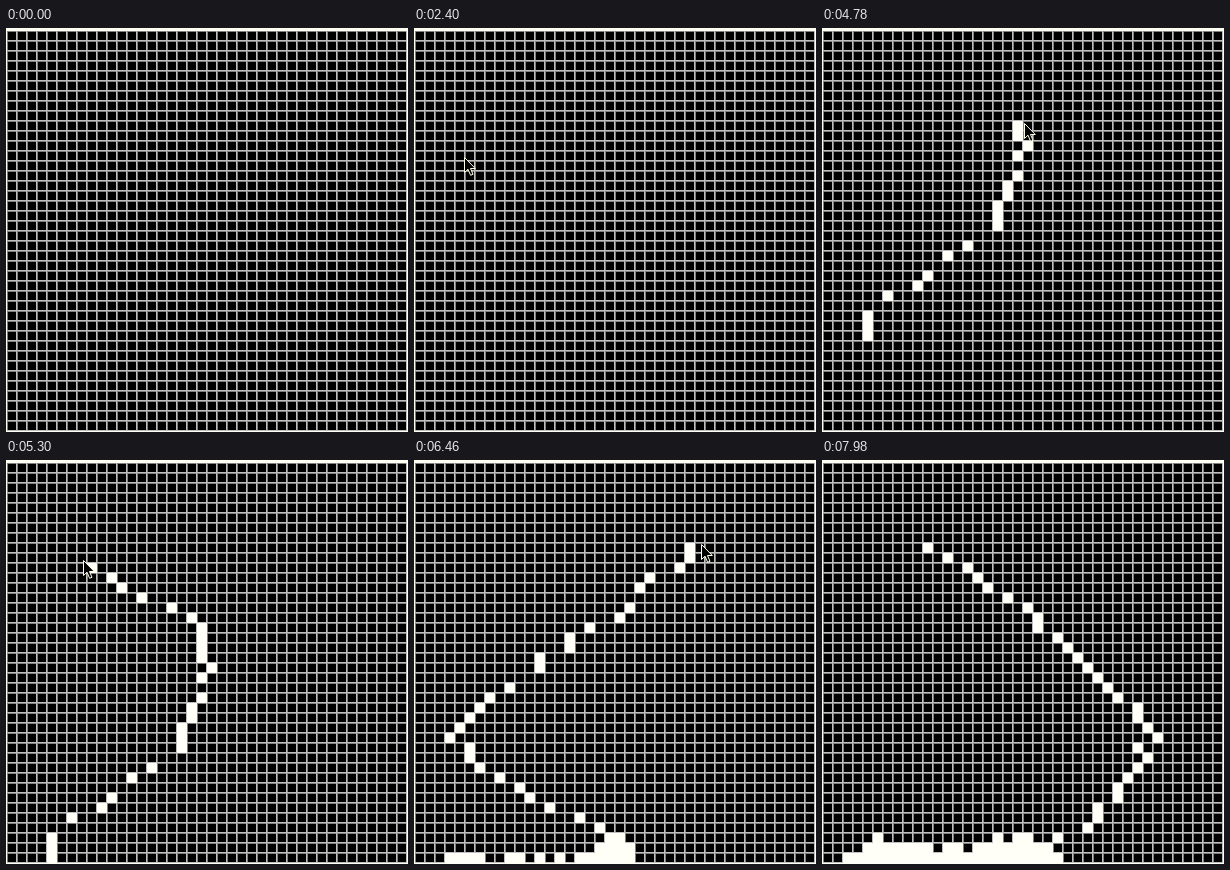
Recreate the animation shown at these times as an HTML page. Size 402 by 404 pixels, loop 8000 ms.

```html
<!DOCTYPE html>
<html lang="en">
<head>
<meta charset="utf-8">
<title>Falling sand</title>
<style>
  html, body { margin: 0; width: 100%; height: 100%; overflow: hidden; background: #fff; }
  svg { display: block; width: 402px; height: 404px; }
</style>
</head>
<body>
<svg viewBox="0 0 402 404" shape-rendering="crispEdges">
  <defs>
    <pattern id="cell" x="1" y="3" width="10" height="10" patternUnits="userSpaceOnUse">
      <rect width="10" height="10" fill="#000"/>
      <path d="M0 0h10v1h-9v9h-1z" fill="#808080"/>
      <path d="M9 0h1v10h-10v-1h9z" fill="#bfbfbf"/>
    </pattern>
  </defs>
  <rect width="402" height="404" fill="#fffff4"/>
  <rect x="1" y="3" width="400" height="400" fill="url(#cell)"/>
  <path id="sand" fill="#fffff8"/>
  <path id="cursor" d="M.5 .5V15.5L4 12.2L6.6 18.3L9 17.3L6.5 11.5H11.3Z"
        fill="#000" stroke="#ffffe8" shape-rendering="auto"/>
</svg>
<script>
const LOOP = 8000, CELL = 10, SIZE = 40, LEFT = 1, TOP = 3;
const FIRST_STEP = -17, LAST_STEP = 58, STEPS_PER_TICK = 14 / 17;
const el = id => document.getElementById(id);

// Key points of the pointer tip: [tick, x, y].
const POINTER = [
  [8, -14, 330], [25, 70, 240], [34, 100, 22], [37, 50, 129], [82, 50, 129],
  [92, 178, 105], [103, 202, 95], [109, 122, 97], [118, 44, 102], [124, 108, 98],
  [136, 260, 85], [146, 326, 83], [154, 272, 83], [171, 105, 83]
];

// Smooth curve through the key points that never overshoots them.
function pointerAt(tick) {
  const last = POINTER.length - 1;
  const t = Math.min(POINTER[last][0], Math.max(POINTER[0][0], tick));
  const i = Math.min(last - 1, Math.max(0, POINTER.findIndex(p => p[0] > t) - 1 + (t === POINTER[last][0] ? last : 0)));
  const a = POINTER[i], b = POINTER[i + 1], h = b[0] - a[0], u = (t - a[0]) / h;
  return [1, 2].map(axis => {
    const slope = j => {
      const k = Math.min(last - 1, Math.max(0, j));
      return (POINTER[k + 1][axis] - POINTER[k][axis]) / (POINTER[k + 1][0] - POINTER[k][0]);
    };
    const tangent = j => {
      const p = slope(j - 1), q = slope(j);
      return p * q > 0 ? 2 * p * q / (p + q) : 0;
    };
    const w = u * u * (3 - 2 * u);
    return a[axis] + (b[axis] - a[axis]) * w
      + h * u * (1 - u) * ((1 - u) * tangent(i) - u * tangent(i + 1));
  });
}

const stepAt = tick => Math.floor(0.8 + (tick - 103) * STEPS_PER_TICK);
const tickOf = step => Math.ceil(103 + (step - 0.8) / STEPS_PER_TICK);

function seeded(seed) {
  return () => (seed = (seed * 16807) % 2147483647) / 2147483647;
}

// Pours one grain per step at the pointer and keeps one path per step.
function simulate() {
  const random = seeded(11), grains = [], paths = [], taken = new Set();
  const key = (c, r) => r * SIZE + c;
  const free = (c, r) => c >= 0 && c < SIZE && r < SIZE && !taken.has(key(c, r));
  for (let s = FIRST_STEP; s <= LAST_STEP; s++) {
    grains.sort((a, b) => b.r - a.r);
    for (const g of grains) {
      const dx = [0, 1, -1].find(d => free(g.c + d, g.r + 1));
      if (dx === undefined) continue;
      taken.delete(key(g.c, g.r));
      g.c += dx;
      g.r++;
      taken.add(key(g.c, g.r));
    }
    const [x, y] = pointerAt(tickOf(s) - 1);
    const c = Math.floor((x - LEFT) / CELL + (random() - 0.5) * 1.2);
    const r = Math.round((y - TOP) / CELL);
    if (free(c, r)) {
      grains.push({ c, r });
      taken.add(key(c, r));
    }
    paths.push(grains.map(g => `M${LEFT + g.c * CELL} ${TOP + g.r * CELL}h10v10h-10z`).join(""));
  }
  return paths;
}

// Three ticks every 140 ms, unevenly spaced.
function tickAt(ms) {
  const phase = ms % 140;
  return 3 * Math.floor(ms / 140) + (phase < 20 ? 0 : phase < 120 ? 1 : 2);
}

const steps = simulate();

function draw(ms) {
  const tick = tickAt(ms);
  const [x, y] = pointerAt(tick).map(Math.round);
  el("sand").setAttribute("d", steps[stepAt(tick) - FIRST_STEP] || "");
  el("cursor").setAttribute("transform", `translate(${x} ${y})`);
}

const start = performance.now();
function loop() {
  draw((performance.now() - start) % LOOP);
  requestAnimationFrame(loop);
}
loop();
</script>
</body>
</html>
```
